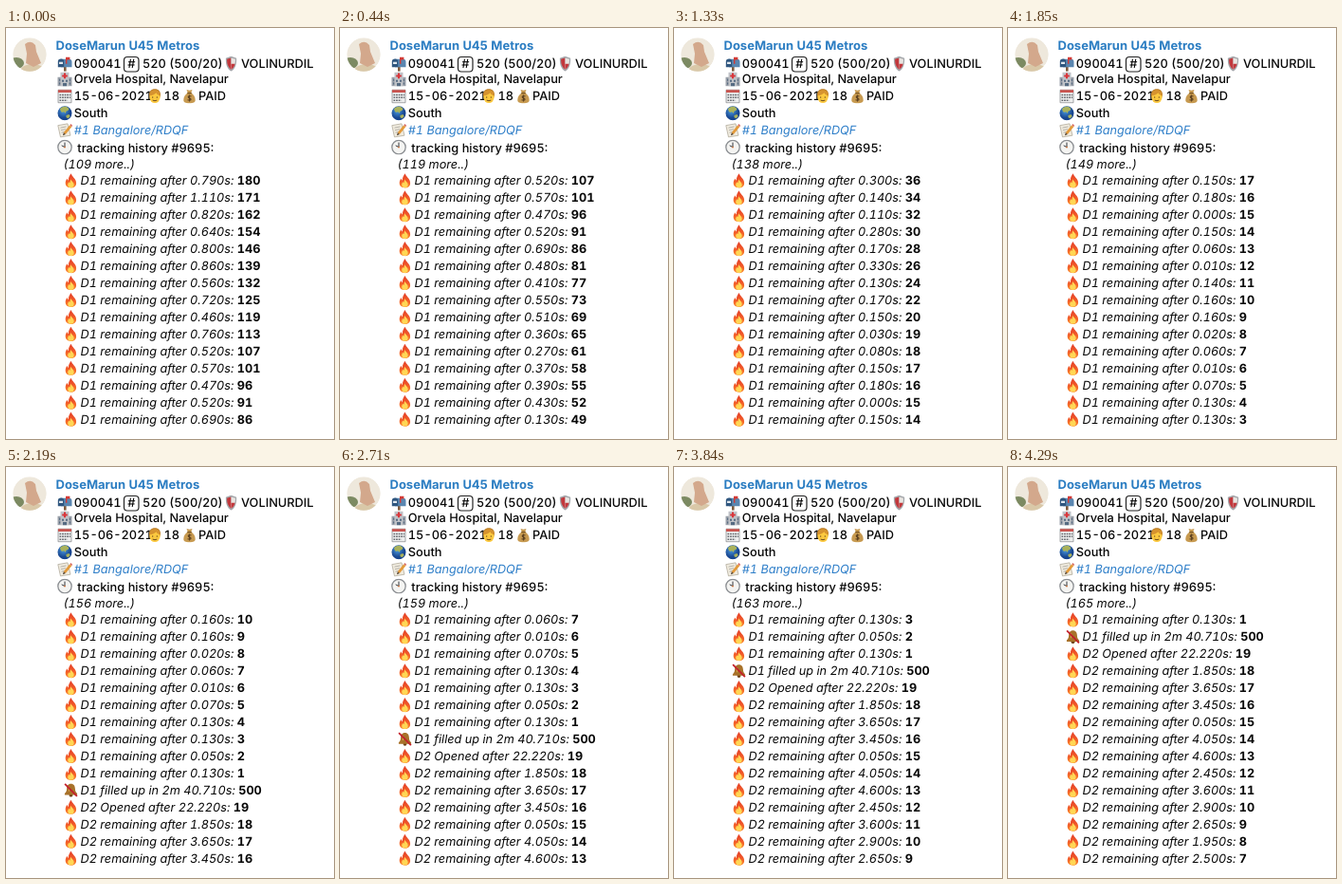
Recreate the animation shown at these times as an HTML page. Size 346 by 433 pixels, loop 4390 ms.

```html
<!DOCTYPE html>
<html lang="en">
<head>
<meta charset="utf-8">
<title>Slot tracker</title>
<style>
  html, body { margin: 0; width: 100%; height: 100%; overflow: hidden; background: #fff; }
  svg { display: block; width: 100vw; height: 100vh; }
  text {
    font: 450 12.8px Inter, "Open Sans", sans-serif; font-variant-numeric: tabular-nums;
    fill: #080808; text-rendering: geometricPrecision; white-space: pre;
  }
  .title { font-size: 13px; font-weight: 650; fill: #2b7dc2; }
  .slant { font-size: 12.7px; font-style: italic; }
  .link { fill: #2f7fc9; }
  .count { font-style: normal; font-weight: 700; }
</style>
</head>
<body>
<svg id="stage" viewBox="0 0 346 433">
  <defs>
    <linearGradient id="fire" x2="0" y2="1">
      <stop offset="0" stop-color="#e23c28"/><stop offset=".55" stop-color="#f25c28"/><stop offset="1" stop-color="#fb8c2c"/>
    </linearGradient>
    <radialGradient id="sea" cx=".4" cy=".35">
      <stop offset="0" stop-color="#4b9be0"/><stop offset="1" stop-color="#17458f"/>
    </radialGradient>
    <clipPath id="round"><circle cx="25" cy="28" r="17.8"/></clipPath>

    <symbol id="flame" viewBox="0 0 16 16">
      <path fill="url(#fire)" d="M8.2.5C9 4 13.600 6 13.600 10.600 13.600 13.800 11.200 15.600 8 15.600S2.200 13.800 2.200 10.400C2.200 8.400 3 7 4 5.600c.2 1.200.6 1.800 1.200 2.200C5.400 4.600 6.600 2.400 8.200.5Z"/>
      <path fill="#ffd755" d="M8 6.600c.6 2.200 3.200 3 3.200 5.800 0 2-1.400 3-3.200 3s-3.300-1.100-3.300-3c0-1.300.7-2.200 1.300-2.900.3.600.6.800 1 .9C7 9.200 7.300 7.900 8 6.600Z"/>
    </symbol>
    <symbol id="bell" viewBox="0 0 16 16">
      <circle cx="8" cy="13.4" r="1.9" fill="#6d4218"/>
      <path fill="#a8722a" d="M8 1.500c3.200 0 4.300 2.400 4.400 5.200.1 2.600.8 3.800 2.200 5.100v1.400H1.400v-1.400c1.400-1.300 2.100-2.500 2.200-5.100C3.700 3.900 4.800 1.500 8 1.500Z"/>
      <path stroke="#d3a24a" stroke-width="1.2" d="M6 4.500v5"/>
      <path stroke="#c3202b" stroke-width="1.8" d="M1.600 1.600 14.400 14.600"/>
    </symbol>
    <symbol id="mailbox" viewBox="0 0 16 16">
      <path fill="#7d5a3c" d="M7 10h2.600v6H7z"/>
      <path fill="#5a86b0" d="M4 3h8.500a3 3 0 0 1 3 3v5.500H4z"/>
      <path fill="#2f567f" d="M.8 6a3.200 3.200 0 0 1 6.400 0v5.500H.8z"/>
      <path fill="#d33a35" d="M9 1h4.400v2.800h-3V8H9z"/>
      <path fill="#dfe7ee" d="M2 6h4v2.400H2z"/>
    </symbol>
    <symbol id="hospital" viewBox="0 0 16 16">
      <path fill="#9aa0a9" d="M.5 6h15v9.500H.5z"/>
      <path fill="#bfc2c7" d="M3.500 1h9v14.500h-9z"/>
      <path fill="#d9363b" d="M7 1.800h2v1.800h1.800v2H9v1.800H7V5.600H5.200v-2H7z"/>
      <path fill="#566b82" d="M2 8h1.200v2H2zm10.800 0H14v2h-1.200zM5 9h2v2H5zm4 0h2v2H9zM2 11.800h1.200v2H2zm10.800 0H14v2h-1.200zM6 12.300h4v3.200H6z"/>
    </symbol>
    <symbol id="calendar" viewBox="0 0 16 16">
      <path fill="#eceded" stroke="#8d9094" stroke-width=".8" d="M1 1.500h14v13.500H1z"/>
      <path fill="#c9544f" d="M1 1.500h14v2.800H1z"/>
      <path stroke="#666a6f" stroke-width="1.500" stroke-dasharray="1.700 .9" d="M2.500 6.800h11.500M2.500 9.600h11.500M2.500 12.400h8"/>
    </symbol>
    <symbol id="globe" viewBox="0 0 16 16">
      <circle cx="8" cy="8" r="7.500" fill="url(#sea)"/>
      <path fill="#a9b25c" d="M3 3.200C5 1.200 8 .8 10 1.200l2.500 2-1 2.200-2 .6-.8 2.400-1.500-1.800L5 7.200 3.500 5.500Zm6.500 7 3-.8 1.200 1.800-2.200 2.300-2-1Z"/>
    </symbol>
    <symbol id="memo" viewBox="0 0 16 16">
      <path fill="#f0ebde" stroke="#b3ad9e" stroke-width=".8" d="m.8 3 10.200-1.800 3 12.300L3.500 15.300Z"/>
      <path stroke="#a5a39d" stroke-width=".8" d="m3.500 5.500 6-1.200M4 8l5-1M4.500 10.500l4-.8"/>
      <path stroke="#e39a3a" stroke-width="2.700" d="m14.300 3.500-6.500 8"/>
      <path stroke="#d9716c" stroke-width="2.700" d="m15.300 2.300-1 1.200"/>
      <path fill="#4c3a28" d="m6.800 10.700 2 1.600-2.800 1.300z"/>
    </symbol>
    <symbol id="clock" viewBox="0 0 16 16">
      <circle cx="8" cy="8" r="7.200" fill="#f4f4f2" stroke="#8b8e92" stroke-width="1.300"/>
      <path fill="none" stroke="#33363a" d="M4.700 6.200 8 8V3"/>
      <circle cx="8" cy="8" r=".9" fill="#d5763c"/>
    </symbol>
    <symbol id="person" viewBox="0 0 16 16">
      <path fill="#b87a22" d="M8 .6c4 0 6 2.600 6 6.400L13 10H3L2 7C2 3.200 4 .6 8 .6Z"/>
      <ellipse cx="8" cy="9" rx="5.600" ry="6.300" fill="#fcc93f"/>
      <path fill="#d6932f" d="M2.300 7.500C2.500 3 5 1.500 8 1.500s5.500 1.500 5.700 6C11 7 10 5.800 9.500 4.500 7.500 6.500 5 7.300 2.300 7.500Z"/>
      <path stroke="#6b4a1f" stroke-linecap="round" fill="none" d="M5.700 9v.6m4.600-.6v.6M6 12.500q2 1.200 4 0"/>
    </symbol>
    <symbol id="bag" viewBox="0 0 16 16">
      <path fill="#c79a50" d="M5 1.200 8 2l3-.8-1.200 3.400c3 2 4.400 5 4.400 7.600 0 2.400-2 3.200-6.200 3.200s-6.200-.8-6.200-3.200c0-2.600 1.400-5.600 4.400-7.600Z"/>
      <path stroke="#7a5522" stroke-width="1.200" d="M5.800 4.800h4.400"/>
      <path fill="none" stroke="#5e4220" stroke-width="1.100" d="M10 8.300C7 7 5.500 9 8 10s2 3.300-2 2M8 6.800v7"/>
    </symbol>
    <symbol id="shield" viewBox="0 0 16 16">
      <path fill="#a3a6aa" d="M8 .2 13.600 2c.3 6-1 11-5.600 14C3.400 13 2.100 8 2.400 2Z"/>
      <path fill="#c2383c" d="M8 1.800v12.400C4.500 11.500 3.500 8 3.600 3.200Z"/>
      <path fill="#e9e5e1" d="M8 1.800v12.400c3.500-2.700 4.500-6.200 4.400-11Z"/>
      <path fill="#c2383c" d="M8 8h4.100C11.600 10.500 10.300 12.500 8 14.200Z"/>
    </symbol>
  </defs>

  <g clip-path="url(#round)">
    <circle cx="25" cy="28" r="17.8" fill="#eee8dc"/>
    <ellipse cx="11" cy="37" rx="8" ry="6" fill="#7c8a62"/>
    <ellipse cx="28" cy="44" rx="12" ry="6" fill="#d9c8a8"/>
    <path fill="#d3a88c" d="M20 17q6-5 11 1l1 7 5 12-8 4-8-4 1-10Z"/>
  </g>
  <rect x="124.500" y="30.500" width="15.500" height="15.500" rx="3.500" fill="none" stroke="#222" stroke-width="1.200"/>
</svg>
<script>
const LOOP = 4390, ROWS = 15, FIRST = 109;
const stage = document.getElementById('stage');
const baseline = line => 22.5 + 17.95 * line;

function add(tag, attrs, content = '', parent = stage) {
  const node = document.createElementNS('http://www.w3.org/2000/svg', tag);
  for (const key in attrs) node.setAttribute(key, attrs[key]);
  node.textContent = content;
  return parent.appendChild(node);
}
const label = (x, line, content, style = '') =>
  add('text', { x, y: baseline(line), class: style }, content);
const icon = (x, line, name) =>
  add('use', { x, y: baseline(line) - 12.6, width: 16, height: 16, href: '#' + name });

// The boxed sign makes its line slightly taller than the rest.
const TALL = 1.1, LIST = 7.96;

label(52.5, 0, 'DoseMarun U45 Metros', 'title');
icon(54, TALL, 'mailbox');
['hospital', 'calendar', 'globe', 'memo', 'clock'].forEach((name, i) => icon(54, i + 2, name));
label(71.8, TALL, '090041');
label(128.2, TALL, '#');
label(144, TALL, '520 (500/20)');
icon(229.5, TALL, 'shield');
label(248, TALL, 'VOLINURDIL');
label(71.8, 2, 'Orvela Hospital, Navelapur');
label(71.8, 3, '15-06-2021');
icon(149, 3, 'person');
label(166.5, 3, '18');
icon(185.5, 3, 'bag');
label(203, 3, 'PAID');
label(71.8, 4, 'South');
label(71.8, 5, '#1 Bangalore/RDQF', 'slant link');
label(75.3, 6.04, 'tracking history #9695:');
const more = label(60.5, 7, '', 'slant');

const rows = Array.from({ length: ROWS }, (_, i) => {
  const text = label(78.5, LIST + i, '', 'slant');
  return {
    icon: icon(60.5, LIST + i, 'flame'),
    note: add('tspan', {}, '', text),
    count: add('tspan', { class: 'count' }, '', text)
  };
});

// Delays between updates, in hundredths of a second.
const firstDose = [79, 111, 82, 64, 80, 86, 56, 72, 46, 76, 52, 57, 47, 52, 69, 48, 41, 55, 51,
  36, 27, 37, 39, 43, 13, 35, 24, 31, 28, 30, 14, 11, 28, 17, 33, 13, 17, 15, 3, 8, 15, 18, 0,
  15, 6, 1, 14, 16, 16, 2, 6, 1, 7, 13, 13, 5, 13];
const secondDose = [185, 365, 345, 5, 405, 460, 245, 360, 290, 265, 195, 250];

const history = [];
const log = (note, count, name = 'flame') => history.push({ note: note + ': ', count, name });
const remaining = (dose, delay, count) =>
  log(`${dose} remaining after ${(delay / 100).toFixed(3)}s`, count);

let left = 180;
for (const delay of firstDose) {
  remaining('D1', delay, left);
  left -= Math.ceil(left / 21);
}
log('D1 filled up in 2m 40.710s', 500, 'bell');
log('D2 Opened after 22.220s', 19);
secondDose.forEach((delay, i) => remaining('D2', delay, 18 - i));

// Evenly spaced scroll steps: [first time, last time, how many].
const scrollTimes = [
  [20, 440, 10], [510, 530, 2], [580, 1060, 11], [1110, 1330, 6], [1380, 1570, 6],
  [1640, 1850, 5], [1900, 2150, 6], [2190, 2290, 3], [2710, 2910, 2], [3300, 3600, 2],
  [3840, 4040, 2], [4290, 4290, 1]
].flatMap(([from, to, n]) => Array.from({ length: n }, (_, i) =>
  Math.round((from + (to - from) * i / Math.max(1, n - 1)) / 10) * 10));

let shown = -1;
function frame() {
  const time = performance.now() % LOOP;
  const offset = scrollTimes.filter(step => step <= time).length;
  if (offset !== shown) {
    shown = offset;
    more.textContent = `(${FIRST + offset} more..)`;
    rows.forEach((row, i) => {
      const entry = history[offset + i];
      row.icon.setAttribute('href', '#' + entry.name);
      row.note.textContent = entry.note;
      row.count.textContent = entry.count;
    });
  }
  requestAnimationFrame(frame);
}
frame();
</script>
</body>
</html>
```
